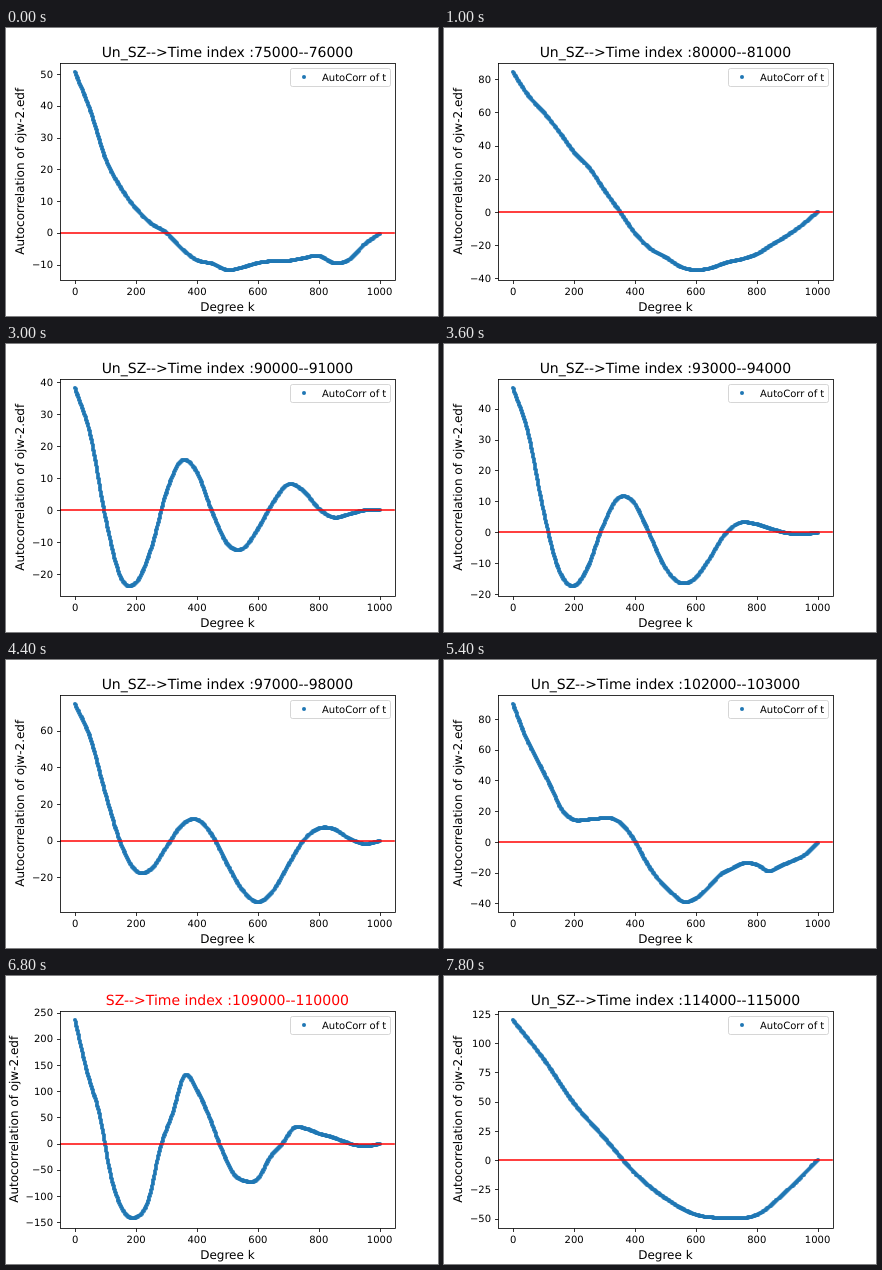
An HTML page that plays this animation: 432x288 px, repeating every 8 s.

```html
<!DOCTYPE html>
<html lang="en">
<head>
<meta charset="utf-8">
<title>Autocorrelation</title>
<style>
  html, body { margin: 0; width: 100%; height: 100%; overflow: hidden; background: #fff; }
  svg { display: block; width: 100%; height: 100%; font-family: "DejaVu Sans", sans-serif; font-size: 10px; text-rendering: geometricPrecision; }
  .axis { fill: none; stroke: #000; stroke-width: .8; }
  .dots { fill: none; stroke: #1f77b4; stroke-width: 4; stroke-linecap: round; }
  .mid { text-anchor: middle; }
  .end { text-anchor: end; }
</style>
</head>
<body>
<svg viewBox="0 0 432 288">
  <rect width="432" height="288" fill="#fff"/>
  <path id="curve" class="dots"/>
  <path id="zero" stroke="#f00" stroke-width="1.5"/>
  <rect class="axis" x="54.5" y="35.5" width="335" height="217"/>
  <g id="xTicks"></g>
  <g id="yTicks"></g>
  <text class="mid" x="221.4" y="283" font-size="12">Degree k</text>
  <text id="yLabel" class="mid" font-size="12">Autocorrelation of ojw-2.edf</text>
  <text id="title" class="mid" x="221.4" y="28.56" font-size="14"></text>
  <rect x="284.5" y="40.5" width="100" height="18" rx="2" fill="#fff" fill-opacity=".8" stroke="#ccc" stroke-opacity=".8"/>
  <path class="dots" d="M298 49h0"/>
  <text x="316" y="52.5">AutoCorr of t</text>
</svg>
<script>
const $ = id => document.getElementById(id);
const LEFT = 54, RIGHT = 388.8, TOP = 34.56, BOTTOM = 252;
const STEP = 200, STEPS = 40;

// Evenly spaced samples of each curve over k = 0..1000
const decay = [50.5, 38.5, 23.3, 14.2, 7.6, 2.9, 0, -5, -8.6, -9.7, -11.7, -10.9, -9.5, -8.9, -8.8, -8, -7.2, -9.5, -8.5, -3.7, -.3];
const valley = [84, 70, 60, 48.5, 36, 26.5, 13, .3, -12.8, -22, -27.2, -33, -35, -33.8, -30.5, -28.5, -25.5, -19.8, -14.3, -7.8, 0];
const ringing = [38, 23.5, -2.5, -21, -22.7, -12, 5.5, 15.4, 11.8, -.5, -10.5, -12.1, -6, 2.3, 8, 6, .5, -2.3, -1.3, -.1, 0];
const swing = [74.3, 56, 25.5, -1.5, -16.5, -15.5, -3.5, 8.3, 11.5, 3, -13, -27, -33.5, -27.5, -13.5, 0, 6.6, 6.3, 1.2, -1.7, -.3];
const shelf = [89.5, 69, 53, 37.5, 21, 14.4, 14.5, 15.2, 15.5, 11, .5, -14, -25, -33, -39, -36.8, -30, -21.5, -17.3, -13.8, -14.8, -19, -15.5, -12.2, -8.3, -.5];
const seizure = [235, 135, 56, -68, -130, -141, -110, -8, 57, 130, 102, 52, -9, -57, -72, -68, -27, -1, 30, 28, 19, 13, 4.5, -3, -5, -1];
const bowl = [119.5, 86.5, 48.5, 19, -11, -32.5, -46.5, -49.2, -46.8, -26, 0];

const keys = [[0, decay], [5, valley], [15, ringing], [22, swing], [27, shelf], [30, seizure], [36, seizure], [39, bowl]];
const steady = new Set([0, 5, 15, 22, 27, 34, 39]);
const isSeizure = n => n >= 30 && n <= 36;

const xOf = k => LEFT + (RIGHT - LEFT) * (k / 1000 + .05) / 1.1;

// Seeded noise in -1..1
function noise(seed) {
  const v = Math.sin(seed * 127.1 + 11.7) * 43758.5453;
  return (v - Math.floor(v)) * 2 - 1;
}

// Catmull-Rom through evenly spaced points, u in 0..1
function spline(p, u) {
  const last = p.length - 1;
  const i = Math.min(last - 1, Math.floor(u * last));
  const t = u * last - i, b = p[i], c = p[i + 1];
  const a = i ? p[i - 1] : 2 * b - c;
  const d = i + 2 <= last ? p[i + 2] : 2 * c - b;
  return b + t / 2 * (c - a + t * (2 * a - 5 * b + 4 * c - d + t * (3 * (b - c) + d - a)));
}

function sample(n) {
  const i = Math.max(0, keys.findIndex(key => key[0] >= n) - 1);
  const [n0, from] = keys[i], [n1, to] = keys[i + 1];
  const mix = (n - n0) / (n1 - n0);
  const wobble = steady.has(n) ? 0 : 1;
  const warp = .15 * wobble * noise(n), gain = 1 + .15 * wobble * noise(n + 50);
  return Array.from({ length: 1001 }, (_, k) => {
    const u = k / 1000, w = u + warp * u * (1 - u);
    return gain * (spline(from, w) * (1 - mix) + spline(to, w) * mix);
  });
}

function tickStep(range) {
  const base = 10 ** Math.floor(Math.log10(range / 9));
  return [1, 2, 2.5, 5, 10].map(m => m * base).find(s => range / s <= 9);
}

const label = v => String(v).replace("-", "\u2212");
const textWidth = s => [...s].reduce((sum, c) => sum + (c === "\u2212" ? 8.38 : c === "." ? 3.18 : 6.36), 0);

function draw(n) {
  const data = sample(n);
  const min = Math.min(...data), max = Math.max(...data);
  const pad = (max - min) * .05, low = min - pad, high = max + pad;
  const yOf = v => BOTTOM - (v - low) / (high - low) * (BOTTOM - TOP);

  // Markers sit on whole pixels
  const dots = new Set(data.map((v, k) => `M${Math.round(xOf(k))} ${Math.round(yOf(v))}h0`));
  $("curve").setAttribute("d", [...dots].join(""));
  $("zero").setAttribute("d", `M${LEFT} ${Math.round(yOf(0))}H${RIGHT}`);

  const step = tickStep(high - low);
  let ticks = "", wide = 0;
  for (let i = Math.ceil(low / step); i * step <= high; i++) {
    const y = yOf(i * step), text = label(i * step);
    wide = Math.max(wide, textWidth(text));
    ticks += `<path class="axis" d="M54.5 ${Math.round(y) + .5}h-3.5"/><text class="end" x="47" y="${y + 3.65}">${text}</text>`;
  }
  $("yTicks").innerHTML = ticks;
  $("yLabel").setAttribute("transform", `translate(${39.4 - wide} 143.3) rotate(-90)`);

  const start = 75000 + n * 1000, hot = isSeizure(n);
  $("title").textContent = `${hot ? "SZ" : "Un_SZ"}-->Time index :${start}--${start + 1000}`;
  $("title").setAttribute("fill", hot ? "#f00" : "#000");
}

$("xTicks").innerHTML = [0, 200, 400, 600, 800, 1000].map(k =>
  `<path class="axis" d="M${Math.round(xOf(k)) + .5} 252.5v3.5"/><text class="mid" x="${xOf(k)}" y="267">${k}</text>`).join("");

let shown = -1;
function tick() {
  const n = Math.floor(performance.now() / STEP) % STEPS;
  if (n !== shown) draw(shown = n);
  requestAnimationFrame(tick);
}
tick();
</script>
</body>
</html>
```
